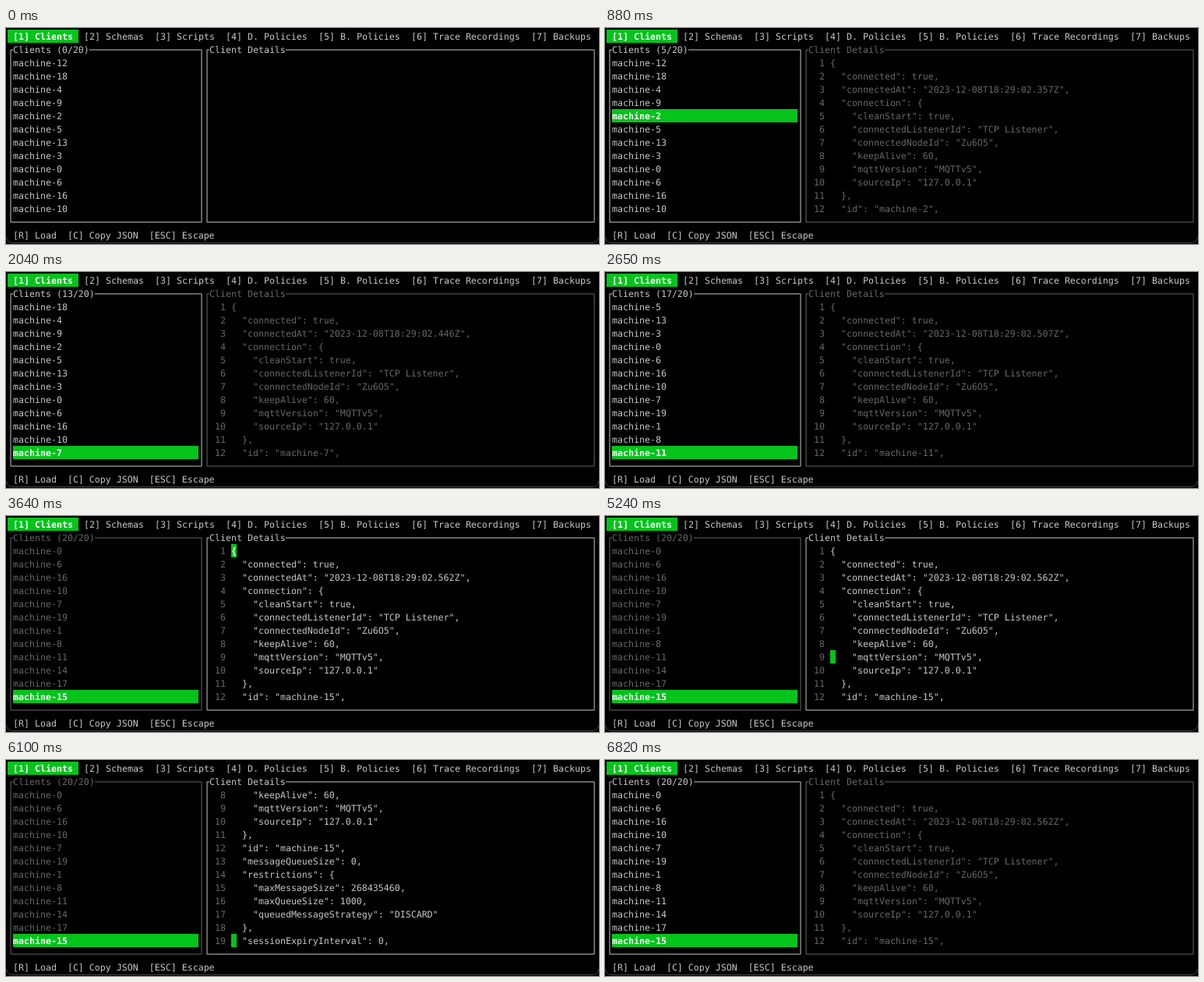
Animation, 761 px wide and 277 px high, one loop 8000 ms. Source, as an HTML page:

```html
<!DOCTYPE html>
<html lang="en">
<head>
<meta charset="utf-8">
<title>Client browser</title>
<style>
  html, body { margin: 0; width: 100%; height: 100%; overflow: hidden; background: #000; }
  svg { display: block; width: 761px; height: 277px; }
  text {
    font: 11.627px "DejaVu Sans Mono", monospace;
    white-space: pre;
    text-rendering: geometricPrecision;
  }
  .bold { font-weight: bold; }
</style>
</head>
<body>
<svg id="screen" viewBox="0 0 761 277"></svg>
<script>
const LOOP = 8000, CELL_W = 7, CELL_H = 17, ROWS = 12;
const LIGHT = '#c7c7c7', DIM = '#676767', GREEN = '#04c31b', WHITE = '#fffefe';

// [machine number, milliseconds of its connection time]
const clients = [
  [12, 521], [18, 604], [4, 393], [9, 477], [2, 357], [5, 412], [13, 535],
  [3, 375], [0, 285], [6, 431], [16, 578], [10, 491], [7, 446], [19, 619],
  [1, 330], [8, 462], [11, 507], [14, 547], [17, 590], [15, 562]
];
const tabs = ['Clients', 'Schemas', 'Scripts', 'D. Policies', 'B. Policies',
  'Trace Recordings', 'Backups'];

// Moments at which the selection moves down by one client
const selectTimes = [90, 440, 620, 700, 880, 1060, 1240, 1420, 1510, 1690, 1770,
  1950, 2040, 2210, 2300, 2480, 2650, 2920, 3100, 3280];
const OPEN = 3640, CLOSE = 6820;

const x = col => 2 + col * CELL_W;
const y = row => 2 + row * CELL_H;
const esc = s => s.replace(/&/g, '&amp;').replace(/</g, '&lt;');

function text(col, row, str, color, cls = '') {
  return `<text x="${x(col)}" y="${y(row) + 13}" fill="${color}" class="${cls}">${esc(str)}</text>`;
}

function mark(col, row, str, width = str.length) {
  return `<rect x="${x(col)}" y="${y(row)}" width="${width * CELL_W}" height="${CELL_H}" fill="${GREEN}"/>`
    + text(col, row, str, WHITE, 'bold');
}

// Box from row 1 to row 14, its title set into the top edge
function pane(left, right, title, color) {
  const l = x(left) + 4, r = x(right) + 4, t = y(1) + 9, b = y(14) + 9;
  const end = x(left + 1 + title.length);
  return `<path d="M${l + 3} ${t}H${l}V${b}H${r}V${t}H${end}" fill="none" stroke="${color}"/>`
    + text(left + 1, 1, title, color);
}

function details([id, ms]) {
  return JSON.stringify({
    connected: true,
    connectedAt: `2023-12-08T18:29:02.${ms}Z`,
    connection: {
      cleanStart: true,
      connectedListenerId: 'TCP Listener',
      connectedNodeId: 'Zu6O5',
      keepAlive: 60,
      mqttVersion: 'MQTTv5',
      sourceIp: '127.0.0.1'
    },
    id: 'machine-' + id,
    messageQueueSize: 0,
    restrictions: {
      maxMessageSize: 268435460,
      maxQueueSize: 1000,
      queuedMessageStrategy: 'DISCARD'
    },
    sessionExpiryInterval: 0,
    willPresent: false
  }, null, 2).split('\n');
}

// Line of the text cursor, counted from 1
function cursorLine(t) {
  if (t < OPEN || t >= CLOSE || t < 4270) return 1;
  if (t < 4810) return 2;
  if (t < 4980) return 4;
  if (t >= 6280) return 21;
  return Math.min(19, 6 + Math.floor((t - 4980) / 85.9));
}

function chrome() {
  let out = '<path d="M0.5 268Q1 275.5 9 275.5H752Q760 275.5 760.5 268" fill="none" stroke="#444"/>';
  let col = 0;
  tabs.forEach((name, i) => {
    const label = ` [${i + 1}] ${name} `;
    out += i ? text(col, 0, label, LIGHT) : mark(col, 0, label);
    col += label.length;
  });
  return out + text(1, 15, '[R] Load  [C] Copy JSON  [ESC] Escape', LIGHT);
}

function list(selected, color) {
  const first = Math.max(0, selected - ROWS);
  let out = pane(0, 35, `Clients (${selected}/${clients.length})`, color);
  clients.slice(first, first + ROWS).forEach(([id], i) => {
    const name = 'machine-' + id;
    out += first + i === selected - 1 ? mark(1, i + 2, name, 34) : text(1, i + 2, name, color);
  });
  return out;
}

function viewer(client, line, focused, color) {
  let out = pane(36, 107, 'Client Details', color);
  if (!client) return out;
  const first = Math.max(0, line - ROWS);
  details(client).slice(first, first + ROWS).forEach((str, i) => {
    const n = first + i + 1;
    out += text(38, i + 2, String(n).padStart(2), DIM);
    if (focused && n === line) {
      out += mark(41, i + 2, str[0]) + text(42, i + 2, str.slice(1), color);
    } else {
      out += text(41, i + 2, str, color);
    }
  });
  return out;
}

const screen = document.getElementById('screen');
const frame = chrome();
let shown = '';

function draw(now) {
  const t = now % LOOP;
  const selected = selectTimes.filter(s => s <= t).length;
  const focused = t >= OPEN && t < CLOSE;
  const line = cursorLine(t);
  const key = [selected, focused, line].join();
  if (key !== shown) {
    shown = key;
    screen.innerHTML = frame
      + list(selected, focused ? DIM : LIGHT)
      + viewer(clients[selected - 1], line, focused, focused || !selected ? LIGHT : DIM);
  }
  requestAnimationFrame(draw);
}

let start;
requestAnimationFrame(function begin(now) {
  start = now;
  const tick = time => draw(time - start);
  const loop = draw;
  draw = time => loop(time < start ? 0 : time - start);
  tick(now);
});
</script>
</body>
</html>
```
